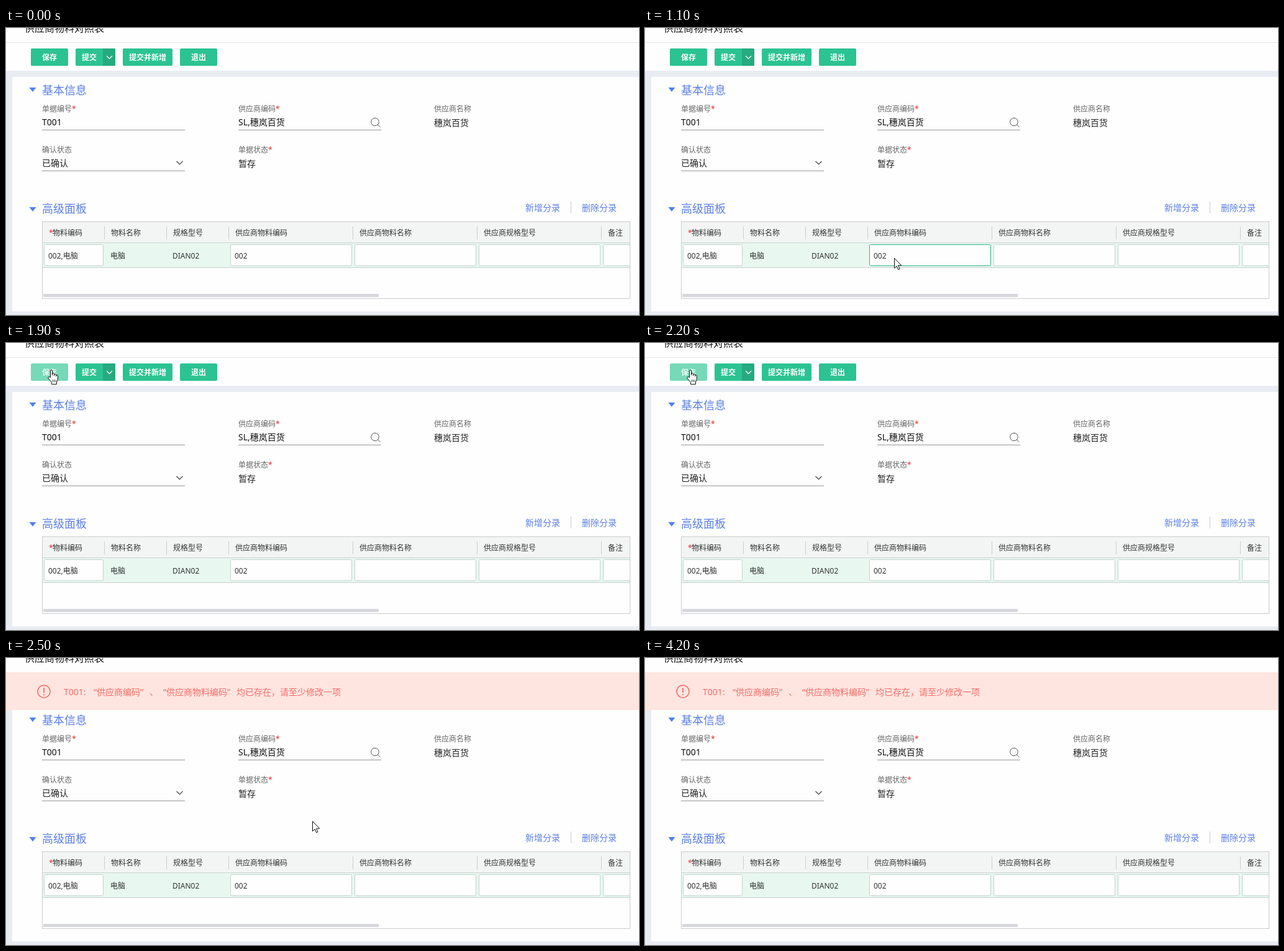
Animation of 1019 by 463 pixels, one loop 4.7 s. Source, as an HTML page:

```html
<!DOCTYPE html>
<html lang="zh-CN">
<head>
<meta charset="utf-8">
<title>供应商物料对照表</title>
<style>
  html, body { margin: 0; width: 100%; height: 100%; overflow: hidden; background: #fff; }
  svg { display: block; width: 1019px; height: 463px; font-family: "Noto Sans", "Noto Sans CJK SC", "Noto Sans CJK", sans-serif; }
  text { white-space: pre; }
  .crisp { shape-rendering: crispEdges; }
</style>
</head>
<body>
<svg id="stage" viewBox="0 0 1019 463"></svg>
<script>
const NS = "http://www.w3.org/2000/svg";
const stage = document.getElementById("stage");
const BLUE = "#5b7fe8", GREEN = "#2bc391", RED = "#f5222d", CORAL = "#f76c66";

function add(tag, attrs, parent = stage) {
  const el = document.createElementNS(NS, tag);
  for (const key in attrs) el.setAttribute(key, attrs[key]);
  parent.appendChild(el);
  return el;
}
const rect = (x, y, width, height, fill, more = {}, parent) =>
  add("rect", { x, y, width, height, fill, ...more }, parent);
const path = (d, stroke, more = {}, parent) =>
  add("path", { d, stroke, fill: "none", ...more }, parent);
const line = (x, y, w, h, fill) => rect(x, y, w, h, fill, { class: "crisp" });

// Text is placed by its left edge and vertical centre, on a whole-pixel baseline.
function label(str, x, mid, size, fill, parent, weight = 400) {
  const y = Math.round(mid + size * 0.38);
  const el = add("text", { x, y, "font-size": size, fill, "font-weight": weight }, parent);
  el.textContent = str;
  return el;
}

// Page and toolbar
rect(0, 0, 1019, 463, "#e9edf3");
rect(0, 0, 1019, 69, "#fefefe");
rect(10, 79, 1009, 378, "#fefefe");
line(0, 23, 1019, 1, "#e3e6ea");
label("供应商物料对照表", 30, 0, 16, "#111");

function button(str, x, w, textX) {
  const box = rect(x, 33, w, 28, GREEN, { rx: 2 });
  const text = label(str, textX, 47, 12, "#fff", stage, 600);
  return { box, text };
}
const save = button("保存", 40, 60, 58);
button("提交", 112, 64, 122);
path("M156 33h18q2 0 2 2v24q0 2-2 2h-18z", "none", { fill: "#26aa7f" });
path("M162 45l4.500 4.500 4.500-4.500", "#fff", { "stroke-width": 1.3 });
button("提交并新增", 188, 80, 198);
button("退出", 280, 60, 298);

// Form
function section(str, mid, tip) {
  path(`M37.500 ${tip - 7}h11l-5.500 7z`, "none", { fill: "#5080ee" });
  label(str, 58, mid, 18, BLUE);
}
function field(name, value, x, y, { star, rule, dy = 22, color = "#222" } = {}) {
  label(name, x, y, 12, "#666");
  if (star) label("*", x + name.length * 12, y, 12, RED);
  label(value, x, y + dy, 14, color);
  if (rule) line(x, y + 34, 230, 1, "#999");
}
section("基本信息", 100, 103);
field("单据编号", "T001", 58, 130, { star: true, rule: true, color: "#111" });
field("供应商编码", "SL,穗岚百货", 374, 130, { star: true, rule: true, color: "#111" });
field("供应商名称", "穗岚百货", 689, 130, { dy: 23 });
field("确认状态", "已确认", 58, 196, { rule: true });
field("单据状态", "暂存", 374, 196, { star: true, dy: 23 });
add("circle", { cx: 594, cy: 151.5, r: 6.3, fill: "none", stroke: "#555" });
path("M598.500 156l4 4", "#555");
path("M274.500 215l5 5 5-5", "#444", { "stroke-width": 1.2 });

section("高级面板", 291, 296);
label("新增分录", 836, 290, 14, BLUE);
line(909, 280, 1, 19, "#ccc");
label("删除分录", 927, 290, 14, BLUE);

// Table
rect(58.5, 312.5, 946, 124, "#fefefe", { stroke: "#ccc" });
line(59, 313, 945, 33, "#f3f5f5");
line(59, 346, 945, 1, "#cbd1cf");
line(59, 347, 945, 39, "#e8f8f1");
line(59, 386, 945, 1, "#c9cfcc");
label("*", 69, 330, 12, RED);
[["物料编码", 75], ["物料名称", 169], ["规格型号", 269], ["供应商物料编码", 369],
 ["供应商物料名称", 569], ["供应商规格型号", 769], ["备注", 969]]
  .forEach(([str, x]) => label(str, x, 330, 12, "#333"));
[158, 258, 358, 558, 758, 958].forEach(x => line(x, 320, 1, 21, "#ccc"));

const cell = (x, w) => rect(x + .5, 349.5, w - 1, 34, "#fefefe", { rx: 2, stroke: "#c4d3cd" });
cell(61, 96);
const codeCell = cell(361, 196);
cell(561, 196);
cell(761, 196);
path("M1004 349.500H963.500q-2 0-2 2v30q0 2 2 2H1004", "#c4d3cd", { fill: "#fefefe" });
line(1004, 313, 1, 124, "#ccc");
[["002,电脑", 68], ["电脑", 168], ["DIAN02", 268], ["002", 368]]
  .forEach(([str, x]) => label(str, x, 367, 12, "#333"));
line(60, 429, 540, 5, "#d6d7dd");

// Error banner
const banner = add("g", {});
rect(0, 23, 1019, 61, "#ffe5e0", {}, banner);
add("circle", { cx: 61, cy: 54, r: 10, fill: "none", stroke: CORAL, "stroke-width": 1.5 }, banner);
path("M61 48v8M61 58.300v2", CORAL, { "stroke-width": 1.8 }, banner);
[["T001:", 93], ["“供应商编码”", 141], ["、", 231], ["“供应商物料编码”", 253],
 ["均已存在，", 371], ["请至少修改一项", 441]]
  .forEach(([str, x]) => label(str, x, 55, 14, CORAL, banner));

// Pointers
const ink = { fill: "#fff", "stroke-linejoin": "round" };
const arrow = path("M.5 .5V16.500L4.200 13 6.600 18.700 9 17.700 6.600 12H11.700Z", "#111", ink);
const hand = add("g", {});
path("M-1.500 13V2A1.500 1.500 0 0 1 1.500 2V9V7.500A1.500 1.500 0 0 1 4.500 7.500V10V8.500" +
  "A1.500 1.500 0 0 1 7.500 8.500V11V10A1.400 1.400 0 0 1 10.300 10V16L8.500 20V23.500H.5V20.500" +
  "L-5 14C-6 12.500-4 11-3 11.500Z", "#111", ink, hand);
path("M2 16v4M4.500 16v4M7 16v4", "#111", { "stroke-width": .8 }, hand);

// Pointer steps: time, x, y, shape
const steps = [
  [0, 0, 0, ""],
  [200, 972, 83, "arrow"], [300, 710, 172, "arrow"], [400, 539, 199, "arrow"],
  [500, 520, 205, "arrow"], [600, 474, 211, "arrow"], [700, 420, 220, "arrow"],
  [800, 359, 264, "arrow"], [900, 399, 370, "arrow"], [1100, 401, 371, "arrow"],
  [1200, 420, 372, "arrow"], [1300, 440, 372, "arrow"], [1400, 438, 370, "arrow"],
  [1500, 380, 55, "arrow"], [1600, 90, 50, "hand"], [1700, 75, 46, "hand"],
  [1900, 73, 43, "hand"], [2300, 75, 47, "hand"], [2400, 221, 178, "hand"],
  [2500, 493, 263, "arrow"], [2600, 551, 280, "arrow"], [2700, 552, 280, "arrow"],
  [3400, 551, 281, "arrow"], [4100, 788, 211, "arrow"], [4200, 0, 0, ""]
];
const within = (t, from, to) => t >= from && t < to;
const show = (el, on) => el.setAttribute("visibility", on ? "visible" : "hidden");

function draw(t) {
  const [, x, y, shape] = steps.findLast(s => s[0] <= t);
  for (const [el, name] of [[arrow, "arrow"], [hand, "hand"]]) {
    show(el, shape === name);
    el.setAttribute("transform", `translate(${x} ${y})`);
  }
  const hover = within(t, 1600, 2400);
  save.box.setAttribute("fill", hover ? "#76d9b8" : GREEN);
  save.text.setAttribute("fill-opacity", hover ? .85 : 1);
  codeCell.setAttribute("stroke", within(t, 900, 1500) ? "#2bb587" : "#c4d3cd");
  show(banner, t >= 2500);
}

const start = performance.now();
function tick() {
  draw((performance.now() - start) % 4700);
  requestAnimationFrame(tick);
}
tick();
</script>
</body>
</html>
```
